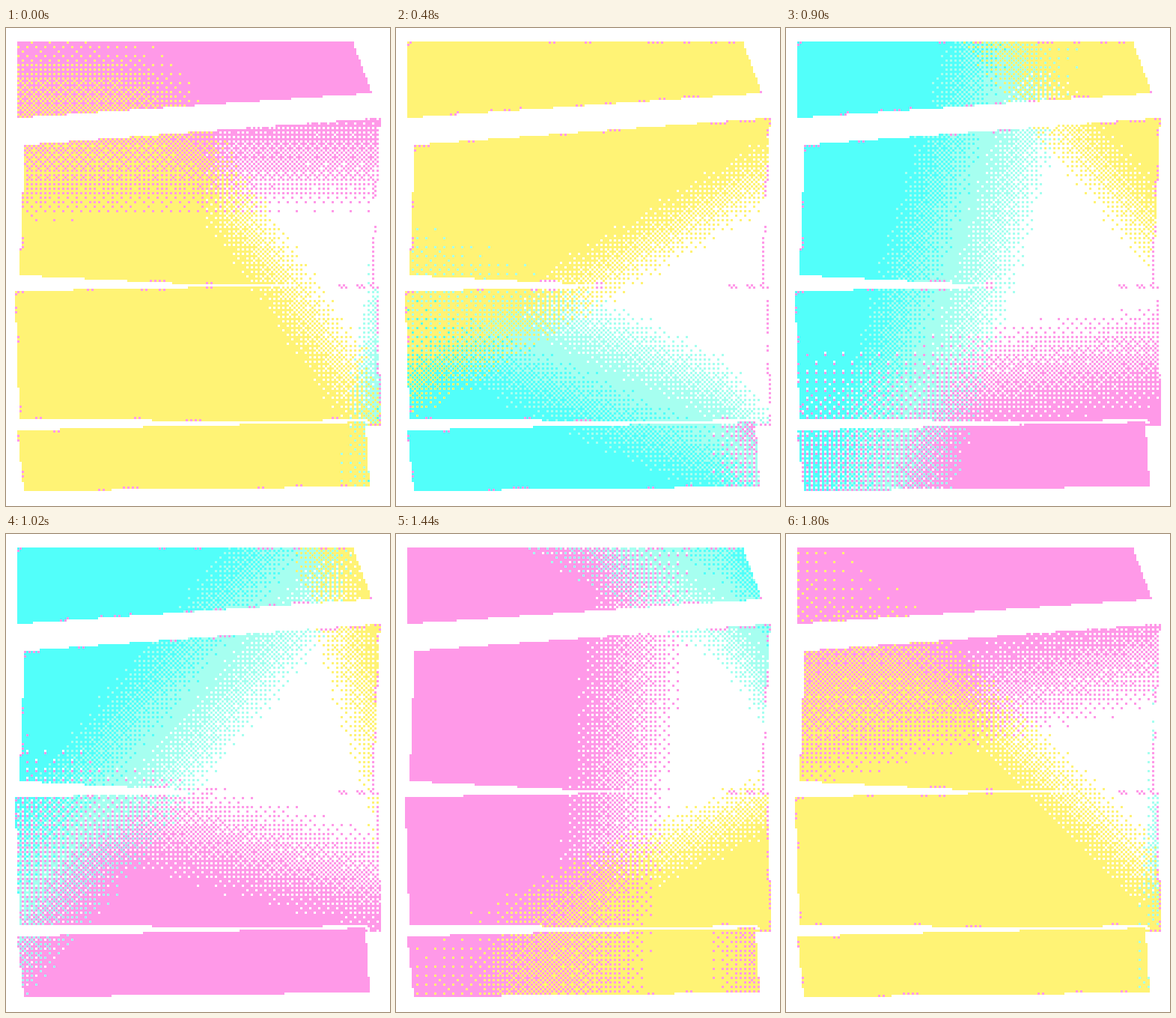
Animation of 513x638 px, one loop 1.86 s. Source, as an HTML page with a canvas:

```html
<!DOCTYPE html>
<html lang="en">
<head>
<meta charset="utf-8">
<title>Dithered bars</title>
<style>
  html, body { margin: 0; width: 100%; height: 100%; overflow: hidden; background: #fff; }
  canvas { display: block; width: 513px; height: 639px; image-rendering: pixelated; }
</style>
</head>
<body>
<canvas id="stage" width="171" height="213"></canvas>
<script>
const LOOP = 1860, STEP = 60, CELL = 3, COLS = 171, ROWS = 213;
const CENTER = { x: 435, y: 310 };
const WHITE = [255, 255, 255], YELLOW = [255, 243, 117], PINK = [255, 153, 232],
      CYAN = [82, 255, 250], PALE = [166, 255, 240];
const BARS = [
  'M15 18H463L489 87L15 120Z',
  'M25 156L500 120L497 190L491 344L270 343L18 330Z',
  'M12 351L270 346L497 345L501 530L300 525L18 521Z',
  'M15 537L240 531L480 526L486 612L24 618Z'
];
const LAST_BAR_RIM = 'M12 533L240 528L483 522L487 530L480 526L240 531L15 537Z';

const ctx = document.getElementById('stage').getContext('2d');
const image = ctx.createImageData(COLS, ROWS);
const ramp = (v, from, to) => Math.min(1, Math.max(0, (v - from) / (to - from)));

// 8x8 ordered-dither threshold, built by interleaving coordinate bits
function threshold(col, row) {
  let value = 0;
  for (let bit = 0; bit < 3; bit++) {
    const x = col >> bit & 1, y = row >> bit & 1;
    value = value * 4 + (x ^ y) * 2 + y;
  }
  return (value + 0.5) / 64;
}

function hash(a, b) {
  const v = Math.sin(a * 127.1 + b * 311.7) * 43758.5453;
  return v - Math.floor(v);
}

function buildCells() {
  const paths = BARS.map(d => new Path2D(d));
  const rim = new Path2D(LAST_BAR_RIM);
  const barAt = (x, y) => {
    if (ctx.isPointInPath(rim, x, y)) return -1;
    for (let i = paths.length - 1; i >= 0; i--) {
      if (ctx.isPointInPath(paths[i], x, y)) return i;
    }
    return -1;
  };
  const cells = [];
  const map = new Int8Array(COLS * ROWS);
  for (let i = 0; i < map.length; i++) {
    map[i] = barAt((i % COLS + 0.5) * CELL, (Math.floor(i / COLS) + 0.5) * CELL);
  }
  for (let i = 0; i < map.length; i++) {
    const bar = map[i];
    if (bar < 0) continue;
    const col = i % COLS, row = Math.floor(i / COLS);
    const x = (col + 0.5) * CELL, y = (row + 0.5) * CELL;
    const edge = [i - 1, i + 1, i - COLS, i + COLS].some(n => map[n] !== bar);
    const speckChance = x > 486 ? 0.5 : 0.12;
    const speck = edge && (col + row) % 2 === 0 && hash(col >> 2, row >> 2) < speckChance;
    cells.push({ i, x, y, bar, speck, limit: threshold(col + 7, row + 7) });
  }
  return cells;
}

const cells = buildCells();

const direction = degrees => {
  const a = degrees * Math.PI / 180;
  return { x: Math.cos(a), y: Math.sin(a) };
};

// Three straight colour fronts sweep around a white centre and mute each other where they overlap.
function colorAt(cell, fronts) {
  const dx = cell.x - CENTER.x, dy = cell.y - CENTER.y;
  const reach = (u, px = dx) => px * u.x + dy * u.y;
  const pinkBoost = cell.bar === 3 ? 2 * Math.max(0, cell.x - 380) : 0;
  const cyanReach = reach(fronts.cyan, dx > 0 ? dx * 2.4 : dx);
  const pinkReach = reach(fronts.pink);

  const rawYellow = ramp(reach(fronts.yellow), 24, 114);
  const rawPink = ramp(pinkReach + pinkBoost, 62, 205);
  const rawCyan = ramp(cyanReach, 110, 203);
  const deep = ramp(cyanReach, 205, 300);

  const yellow = rawYellow * (1 - 0.9 * ramp(pinkReach, 200, 290));
  const pink = rawPink * (1 - 0.8 * rawCyan);
  const cyan = rawCyan * (1 - 0.8 * rawYellow) * (1 - 0.4 * rawPink);
  const total = Math.max(1, yellow + pink + cyan);

  let level = cell.limit * total;
  if ((level -= pink) < 0) return PINK;
  if ((level -= cyan * deep) < 0) return CYAN;
  if ((level -= cyan * (1 - deep)) < 0) return PALE;
  if ((level -= yellow) < 0) return YELLOW;
  return WHITE;
}

function draw(time) {
  const turn = Math.floor(time % LOOP / STEP) * STEP / LOOP * 360;
  const fronts = {
    cyan: direction(22 + turn),
    yellow: direction(146 + turn),
    pink: direction(268 + turn)
  };
  image.data.fill(255);
  for (const cell of cells) {
    image.data.set(cell.speck ? PINK : colorAt(cell, fronts), cell.i * 4);
  }
  ctx.putImageData(image, 0, 0);
}

function tick() {
  draw(performance.now());
  requestAnimationFrame(tick);
}
tick();
</script>
</body>
</html>
```
